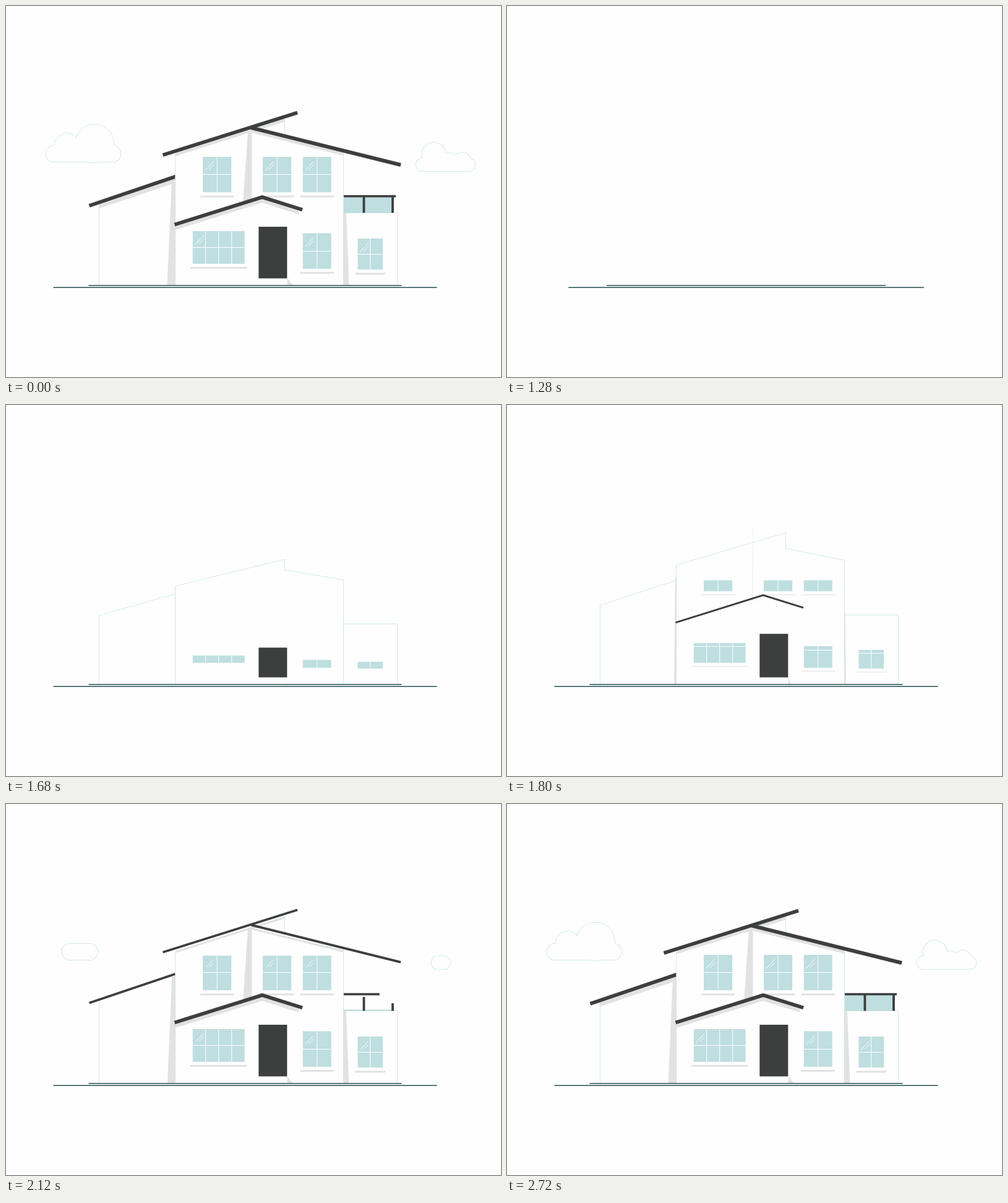
Recreate the animation shown at these times as an HTML page with a canvas. Size 800 by 600 pixels, loop 3480 ms.

```html
<!DOCTYPE html>
<html lang="en">
<head>
<meta charset="utf-8">
<title>House</title>
<style>
  html, body { margin: 0; height: 100%; overflow: hidden; background: #fefefe; }
  canvas { display: block; }
</style>
</head>
<body>
<canvas id="stage" width="800" height="600"></canvas>
<script>
const ctx = document.getElementById('stage').getContext('2d');
const LOOP = 3480, STEP = 40, RESET = 720;
const WHITE = '#fefefe', DARK = '#3d3f3e', GLASS = '#bfdee0', SHADE = '#e2e2e2', EDGE = '#b5dcdc', GROUND = '#24504f';
const BASE = 451.5;
let now = 0;

const clamp = v => Math.max(0, Math.min(1, v));
const grow = (start, duration) => 1 - (1 - clamp((now - start) / duration)) ** 2;
const smooth = (start, duration) => {
  const p = clamp((now - start) / duration);
  return p * p * (3 - 2 * p);
};

function trace(points) {
  ctx.beginPath();
  points.forEach(([x, y]) => ctx.lineTo(x, y));
}

function fill(points, color) {
  trace(points);
  ctx.fillStyle = color;
  ctx.fill();
}

function stroke(points, color, width) {
  if (width <= 0) return;
  trace(points);
  ctx.strokeStyle = color;
  ctx.lineWidth = width;
  ctx.stroke();
}

function rect(x, y, w, h, color) {
  ctx.fillStyle = color;
  ctx.fillRect(x, y, w, h);
}

// Wall rising from the ground; its top runs from (x1, y1) to (x2, y2)
function wall(x1, y1, x2, y2, p, outline = true) {
  if (!p) return;
  const lift = y => BASE - (BASE - y) * p;
  const top = [[x1, lift(y1)], [x2, lift(y2)], [x2, BASE]];
  fill([[x1, BASE], ...top], WHITE);
  stroke(outline ? [[x1, BASE], ...top] : top, EDGE, 0.6);
}

// Shade polygon that widens sideways from the line x = pivot
function sideShade(points, pivot, p) {
  if (p) fill(points.map(([x, y]) => [pivot + (x - pivot) * p, y]), SHADE);
}

// Strip of shade that deepens downwards from the given line
function eaveShade(points, depth, p) {
  if (p) fill([...points, ...points.map(([x, y]) => [x, y + depth * p]).reverse()], SHADE);
}

// Roof beam that thickens downwards from its upper edge
function roof(points, p) {
  const shift = 3.1 * (p - 1);
  stroke(points.map(([x, y]) => [x, y + shift]), DARK, 6 * p);
}

function pane(x, y, w, h, bar, columns, start, glintStart) {
  const sill = 3 * grow(1720, 470), bottom = y + h + 5;
  if (sill) {
    fill([[x - 3, bottom], [x + w + 5, bottom], [x + w + 5 - sill * 0.6, bottom + sill],
      [x - 3 - sill * 0.6, bottom + sill]], SHADE);
  }
  const shown = h * grow(start, 470);
  if (!shown) return;
  ctx.save();
  ctx.beginPath();
  ctx.rect(x, y + h - shown, w, shown);
  ctx.clip();
  rect(x, y, w, h, GLASS);
  stroke([[x, bar], [x + w, bar]], WHITE, 1);
  for (let i = 1; i < columns; i++) {
    const cx = x + w * i / columns;
    stroke([[cx, y], [cx, y + h]], WHITE, 1);
  }
  const glint = grow(glintStart, 400);
  if (glint) {
    for (const [gx, gy, rx, ry] of [[11, 14.3, 7, 7.5], [14, 16.5, 3.7, 4.2]]) {
      stroke([[x + gx - rx * glint, y + gy + ry * glint], [x + gx + rx * glint, y + gy - ry * glint]], WHITE, 1);
    }
  }
  ctx.restore();
}

// Pill spreading from an origin, then round bumps swelling out of it
function cloud(left, right, top, bottom, origin, p, bumps) {
  if (!p) return;
  const x1 = origin - (origin - left) * p, x2 = origin + (right - origin) * p;
  const h = Math.min(bottom - top, x2 - x1), mid = (top + bottom) / 2;
  const shape = new Path2D();
  shape.roundRect(x1, mid - h / 2, x2 - x1, h, h / 2);
  for (const [x, y, r, start] of bumps) {
    const s = grow(start, 440), cy = mid + (y - mid) * s;
    if (!s) continue;
    shape.moveTo(x + r * s, cy);
    shape.arc(x, cy, r * s, 0, 2 * Math.PI);
  }
  ctx.strokeStyle = EDGE;
  ctx.lineWidth = 1.2;
  ctx.stroke(shape);
  ctx.fillStyle = WHITE;
  ctx.fill(shape);
}

function balcony() {
  const glass = 26 * grow(2110, 250);
  rect(546, 334.5 - glass, 81, glass, GLASS);
  for (const [x, start] of [[576.5, 1860], [623, 2008]]) {
    const h = 25.5 * grow(start, 400);
    rect(x, 334.5 - h, 3.8, h, DARK);
  }
  rect(545.5, 305.8, 84.5 * grow(1943, 400), 3.6, DARK);
}

function groundLine(y, half, start) {
  const reach = half * grow(start, 700);
  if (reach) stroke([[386.5 - reach, y], [386.5 + reach, y]], GROUND, 1.5);
}

function draw() {
  ctx.clearRect(0, 0, 800, 600);
  const beams = grow(1970, 390);

  cloud(64.5, 185.5, 225.5, 252.5, 114, smooth(1790, 680), [[143, 222.5, 31, 2240], [98, 225.5, 19.5, 2280]]);
  cloud(662.5, 758.5, 246, 267.5, 699, smooth(1910, 550),
    [[691.5, 240, 19.5, 2240], [737, 250, 13.5, 2280], [717, 250, 12.5, 2280]]);

  wall(545.5, 334.5, 632.5, 334.5, grow(1325, 600));
  sideShade([[545.5, 335], [550, 335], [554.5, BASE], [545.5, BASE]], 545.5, grow(1737, 470));
  balcony();

  wall(150.5, 318, 273.5, 276, grow(1326, 600));
  sideShade([[268, 280], [273.5, 278], [273.5, BASE], [260.5, BASE]], 273.5, grow(1732, 470));
  eaveShade([[150.5, 321], [273.5, 279.4]], 6.5, grow(2120, 240));
  roof([[134.5, 323], [285, 272.1]], beams);

  wall(273.5, 240, 450.5, 182, grow(1380, 600));
  eaveShade([[274, 237.7], [450, 182.3]], 5, beams);
  wall(449.8, 215, 545.5, 236, grow(1360, 600), false);
  sideShade([[391, 202], [397.5, 200], [397.5, 318], [383, 318]], 397.5, grow(1790, 300));
  eaveShade([[398, 200.3], [545, 237]], 5, beams);

  for (const x of [318, 415, 479.5]) pane(x, 244, 46.3, 57.5, 272.5, 2, 1720, 1940);
  pane(301.5, 364, 84.3, 53, 390.5, 4, 1625, 1870);
  pane(479.5, 367.3, 46.3, 57.7, 396.5, 2, 1625, 1870);
  pane(568.2, 376, 40.8, 50.5, 401.5, 2, 1625, 1870);

  sideShade([[454.5, 440], [463.5, BASE], [454.5, BASE]], 454.5, grow(1660, 470));
  const door = 83.5 * grow(1516, 470);
  rect(408.3, 440.5 - door, 46, door, DARK);

  roof([[253.5, 241], [471, 172.5]], beams);
  roof([[396, 196.8], [638, 257]], beams);
  eaveShade([[274, 356], [414, 312.3], [473, 331]], 6, grow(1820, 300));
  roof([[272.5, 353.5], [414, 309.2], [479, 329.5]], grow(1685, 400));

  groundLine(452, 253, 810);
  groundLine(455.3, 310, 770);
}

function tick() {
  const t = Math.floor(performance.now() % LOOP / STEP) * STEP;
  now = t < RESET ? LOOP : t;
  draw();
  requestAnimationFrame(tick);
}
tick();
</script>
</body>
</html>
```
